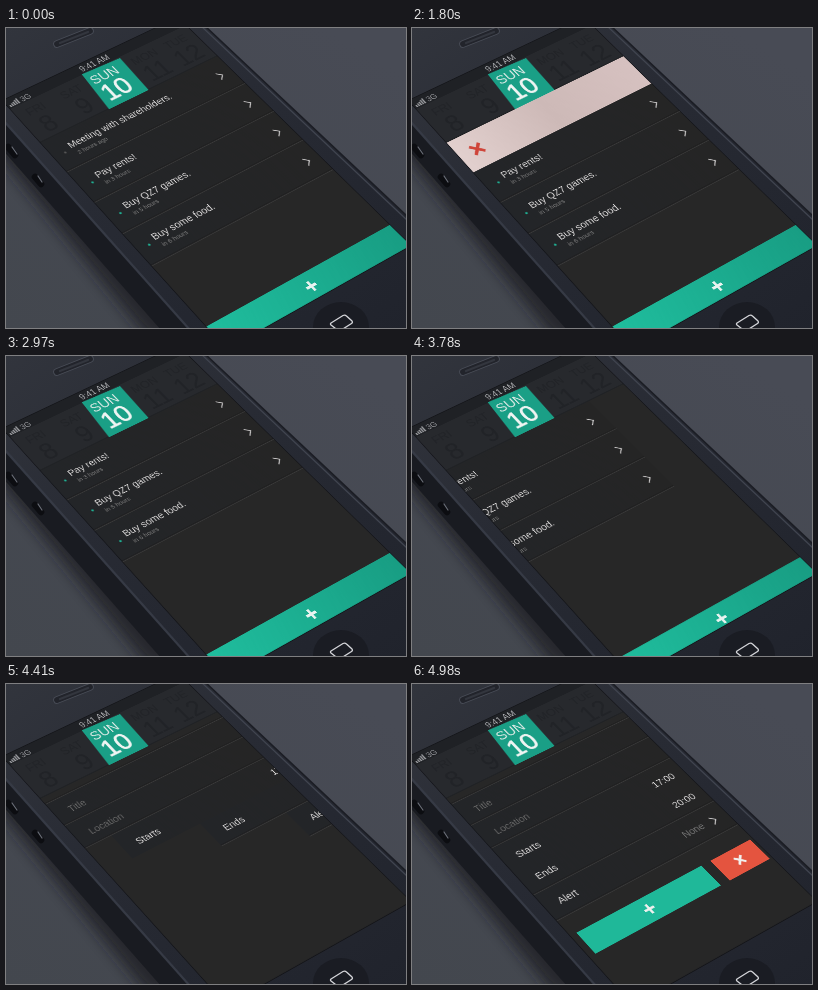
Write an HTML page that moves like this. It is 400 by 300 pixels and loops after 5.4 s.

```html
<!DOCTYPE html>
<html lang="en">
<head>
<meta charset="utf-8">
<title>To-do list</title>
<style>
  html, body { margin: 0; width: 100%; height: 100%; overflow: hidden; background: #3e414a; }
  #stage { position: relative; width: 400px; height: 300px; overflow: hidden; }
  #stage > svg { position: absolute; left: 0; top: 0; }
  #screen { position: absolute; left: 0; top: 0; width: 320px; height: 477px; overflow: hidden; transform-origin: 0 0; background: #272727; }
  #screen svg { display: block; }
  text { font-family: "Liberation Sans", Arial, sans-serif; }
</style>
</head>
<body>
<div id="stage">
  <svg width="400" height="300" viewBox="0 0 400 300">
    <defs>
      <linearGradient id="desk" x1="0" y1="1" x2=".8" y2="0">
        <stop offset="0" stop-color="#43474e"/><stop offset="1" stop-color="#484b55"/>
      </linearGradient>
      <linearGradient id="face" x1="0" y1="0" x2="1" y2="1">
        <stop offset="0" stop-color="#32353d"/><stop offset=".4" stop-color="#282b34"/><stop offset="1" stop-color="#20232c"/>
      </linearGradient>
      <filter id="soft"><feGaussianBlur stdDeviation="7"/></filter>
    </defs>
    <rect width="400" height="300" fill="url(#desk)"/>
    <path d="M-20 112L142 310H190L-20 80Z" fill="#1b1d23" opacity=".75" filter="url(#soft)"/>
    <path d="M-5 85V120L155 302H195Z" fill="#191b21"/>
    <path d="M-5 -5H196L405 192V305H186L-5 89Z" fill="url(#face)"/>
    <path d="M-2 93L184 302" stroke="#363a45" stroke-width="2.2"/>
    <path d="M199 -2L402 189" stroke="#1b1d24" stroke-width="1.5"/>
    <path d="M195 -2L402 193" stroke="#414550" stroke-width="1.2"/>
    <g id="keys" stroke-linecap="round">
      <path d="M2 119L9 127M29 149L35 156" stroke="#0c0d11" stroke-width="6.5"/>
      <path d="M6 119L11 126M32 148L36 154" stroke="#6b6f79" stroke-width="1.2"/>
    </g>
    <g stroke-linecap="round">
      <path d="M51 16L84 3" stroke="#484c56" stroke-width="7.6"/>
      <path d="M51 16L84 3" stroke="#22242b" stroke-width="5.8"/>
      <path d="M54 15L82 4" stroke="#33363e" stroke-width="2.4"/>
    </g>
    <ellipse cx="335" cy="299" rx="28" ry="25" fill="#1a1c23"/>
    <path d="M325 295L337 287.5Q339 286.5 340.5 288L346 293Q347 294.5 345.5 295.5L334.5 302.5Q333 303.5 331.5 302L325 297Q324 296 325 295Z" fill="none" stroke="#d5d6da" stroke-width="1.3"/>
  </svg>
  <div id="screen">
    <svg width="320" height="477" viewBox="0 -89 320 477">
      <defs>
        <linearGradient id="pink">
          <stop offset="0" stop-color="#e2d0ce"/><stop offset=".5" stop-color="#cdb9b7"/><stop offset="1" stop-color="#d6c1c0"/>
        </linearGradient>
        <linearGradient id="teal">
          <stop offset="0" stop-color="#1fbd9d"/><stop offset="1" stop-color="#189d83"/>
        </linearGradient>
        <linearGradient id="row" gradientUnits="userSpaceOnUse" x1="0" y1="0" x2="320" y2="0">
          <stop offset="0" stop-color="#232528"/><stop offset="1" stop-color="#252525"/>
        </linearGradient>
      </defs>
      <g id="list"></g>
      <g id="form"></g>
      <g id="strip"></g>
      <g id="swipe">
        <rect width="320" height="60" fill="url(#pink)"/>
        <path d="M23 22L39 38M39 22L23 38" stroke="#cf4439" stroke-width="4.6"/>
      </g>
      <g id="bar">
        <rect y="348" width="320" height="42" fill="url(#teal)"/>
        <path d="M160 361V377M152 369H168" stroke="#e9f3f0" stroke-width="3.8"/>
      </g>
      <rect x=".5" y="-88.5" width="319" height="476" fill="none" stroke="#121317" stroke-width="1.2"/>
    </svg>
  </div>
</div>
<script>
const LOOP = 5400, W = 320, ROW = 60;
const $ = id => document.getElementById(id);

// Perspective that puts the first four rows on these corners.
function project(el, [p, q, r, s], w, h) {
  const dx1 = q[0] - r[0], dy1 = q[1] - r[1];
  const dx2 = s[0] - r[0], dy2 = s[1] - r[1];
  const sx = p[0] - q[0] + r[0] - s[0], sy = p[1] - q[1] + r[1] - s[1];
  const den = dx1 * dy2 - dx2 * dy1;
  const g = (sx * dy2 - dx2 * sy) / den, k = (dx1 * sy - sx * dy1) / den;
  const m = [
    (q[0] - p[0] + g * q[0]) / w, (q[1] - p[1] + g * q[1]) / w, 0, g / w,
    (s[0] - p[0] + k * s[0]) / h, (s[1] - p[1] + k * s[1]) / h, 0, k / h,
    0, 0, 1, 0,
    p[0], p[1], 0, 1
  ];
  el.style.transform = `matrix3d(${m.map(n => n.toFixed(8))}) translateY(-89px)`;
}
project($("screen"), [[34, 115], [212, 28], [328, 141.5], [145.5, 238.6]], W, 4 * ROW);

const label = (x, y, size, fill, str, anchor = "start") =>
  `<text x="${x}" y="${y}" font-size="${size}" fill="${fill}" text-anchor="${anchor}">${str}</text>`;
const rule = y =>
  `<path d="M0 ${y - 2}H${W}" stroke="#1a1a1b" stroke-width="1.2"/><path d="M0 ${y - .7}H${W}" stroke="#393939" stroke-width="1.3"/>`;
const chevron = (x, y) =>
  `<path class="chev" d="M${x - 3.5} ${y - 6.5}L${x + 3.5} ${y}L${x - 3.5} ${y + 6.5}" fill="none" stroke="#d2d0d0" stroke-width="1.6"/>`;

// Status bar and dates
const days = [[32, "FRI", 8], [95, "SAT", 9], [227, "MON", 11], [285, "TUE", 12]];
$("strip").innerHTML =
  `<rect y="-89" width="${W}" height="89" fill="#27292d"/><rect y="-89" width="${W}" height="19" fill="#1f2125"/>` +
  days.map(([x, day, n]) =>
    label(x, -46, 19, "#222428", day, "middle") + label(x, -9, 40, "#212327", n, "middle")).join("") +
  `<path d="M0 -1H${W}" stroke="#1b1c1f"/>` +
  `<path d="M128 -71L195 -68L192 0H121Z" fill="#1a9f86"/>` +
  label(155, -46, 22, "#d9e8e4", "SUN", "middle") +
  `<g stroke="#eef4f2" stroke-width=".9">${label(154, -11, 41, "#eef4f2", "10", "middle")}</g>` +
  label(157, -74, 14, "#b3b4b7", "9:41 AM", "middle") + label(24, -72, 12.5, "#96979b", "3G") +
  [0, 1, 2, 3, 4].map(i =>
    `<rect x="${4 + i * 3.5}" y="${-76 - i * 1.5}" width="2.3" height="${4 + i * 1.5}" fill="#96979b"/>`).join("");

// Tasks
const tasks = [
  ["Meeting with shareholders.", "2 hours ago", "#565656"],
  ["Pay rents!", "in 3 hours", "#1fae92"],
  ["Buy QZ7 games.", "in 5 hours", "#1fae92"],
  ["Buy some food.", "in 6 hours", "#1fae92"]
];
$("list").innerHTML = tasks.map(([name, when, dot]) =>
  `<g><rect width="${W}" height="${ROW}" fill="url(#row)"/>` + rule(ROW) +
  `<circle cx="20" cy="31" r="1.8" fill="${dot}"/>` +
  label(31, 29.5, 15.2, "#d8d6d6", name) + label(35, 43, 9.6, "#7d7d7d", when) +
  chevron(298, 31) + `</g>`).join("");
const rows = [...$("list").children];
const firstChevron = rows[0].querySelector(".chev");

// Event form: top, height, baseline, label, value
const fields = [
  [10, 45, 40, "Title", ""],
  [55, 45, 85, "Location", ""],
  [100, 45, 131, "Starts", "17:00"],
  [145, 45, 173, "Ends", "20:00"],
  [190, 48, 219, "Alert", "None"]
];
$("form").innerHTML = fields.map(([top, h, base, name, value], i) => {
  const last = i === 4;
  return `<g><rect y="${top}" width="${W}" height="${h}" fill="url(#row)"/>` +
    (i === 0 ? rule(top + 2) : "") + (i === 2 ? "" : rule(top + h)) +
    label(23, base, 15.2, i < 2 ? "#666" : "#d8d6d6", name) +
    label(last ? 277 : 302, base, 15.2, last ? "#757575" : "#d8d6d6", value, "end") +
    (last ? chevron(295, 215) : "") + `</g>`;
}).join("") +
  `<g><rect x="11" y="265" width="216" height="38" fill="#1fb899"/><rect x="243" y="265" width="72" height="38" fill="#e4543f"/>` +
  `<path d="M119 276V292M111 284H127M273 278L285 290M285 278L273 290" stroke="#f1f1ef" stroke-width="3.6"/></g>`;
const parts = [...$("form").children];
const starts = [3925, 4021, 4117, 4213, 4309, 4565];

const ease = p => p < .5 ? 2 * p * p : 1 - 2 * (1 - p) ** 2;
const span = (t, from, to) => ease(Math.min(1, Math.max(0, (t - from) / (to - from))));
const move = (el, x, y = 0) => el.setAttribute("transform", `translate(${x.toFixed(2)} ${y.toFixed(2)})`);
const fade = (el, a) => el.setAttribute("opacity", a.toFixed(3));

function pose(t) {
  const nudge = span(t, 720, 1100);
  move(firstChevron, -34 * nudge);
  fade(firstChevron, 1 - nudge);

  const sweep = span(t, 1115, 1800);
  move($("swipe"), W * (1 - sweep));
  fade($("swipe"), sweep > 0 ? 1 - span(t, 2040, 2595) : 0);

  const lift = span(t, 2580, 2970), leave = span(t, 3520, 4340);
  rows.forEach((row, i) => move(row, -W * leave, ROW * (i - (i ? lift : 0))));
  fade(rows[0], t < 1800 ? 1 : 0);
  move($("bar"), 0, 40 * leave);

  parts.forEach((part, i) => move(part, W * (1 - span(t, starts[i], starts[i] + 400))));
}

const origin = performance.now();
function tick() {
  pose((performance.now() - origin) % LOOP);
  requestAnimationFrame(tick);
}
pose(0);
requestAnimationFrame(tick);
</script>
</body>
</html>
```
